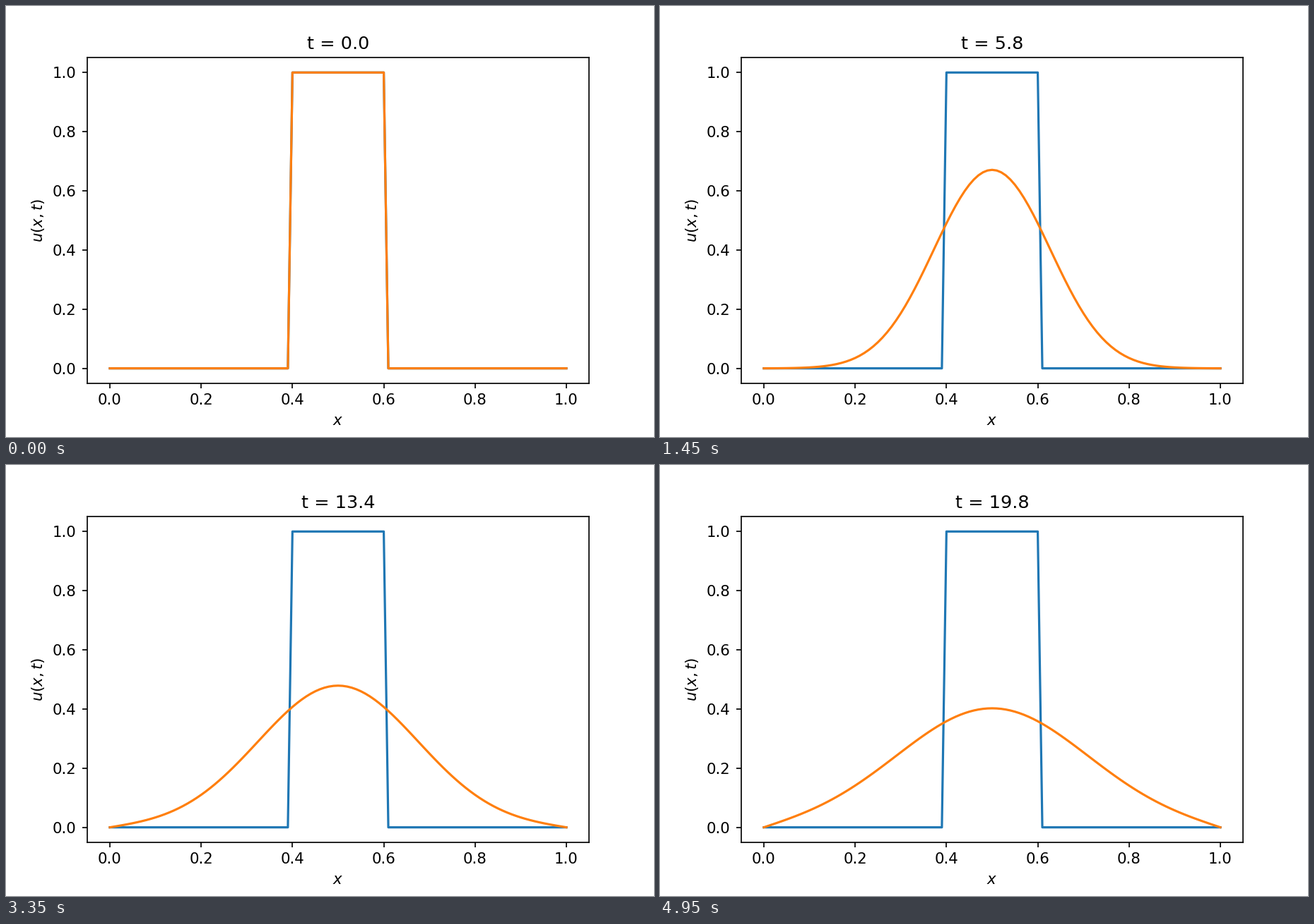
Animation of 917 by 611 pixels, one loop 5 s. Source, as a matplotlib script:

```python
import numpy as np
import matplotlib.pyplot as plt
from matplotlib.animation import FuncAnimation

WIDTH, HEIGHT, DPI = 917, 611, 152.8
FRAMES, INTERVAL = 100, 50
TIME_STEP = 0.2
DIFFUSIVITY = 0.001
CELLS = 100

x = np.linspace(0, 1, CELLS + 1)
start = np.where(np.abs(x - 0.5) < 0.105, 1.0, 0.0)

# Sine modes of the heat equation on the grid, held at zero at both ends
k = np.arange(1, CELLS)
modes = np.sin(np.pi * np.outer(x, k))
weights = 2 / CELLS * modes.T @ start
rates = DIFFUSIVITY * (2 * CELLS * np.sin(np.pi * k / (2 * CELLS))) ** 2


def solve(t):
    if t == 0:
        return start
    return modes @ (weights * np.exp(-rates * t))


# The tiny margin keeps the pixel size from rounding down
fig, ax = plt.subplots(
    figsize=((WIDTH + 1e-6) / DPI, (HEIGHT + 1e-6) / DPI), dpi=DPI
)
fig.subplots_adjust(left=0.125, right=0.9, bottom=0.125, top=0.88)
ax.plot(x, start, color="#1f77b4")
(curve,) = ax.plot(x, start, color="#ff7f0e")
ax.set_xlabel("$x$")
ax.set_ylabel("$u(x, t)$")
title = ax.set_title("t = 0.0")


def update(frame):
    t = frame * TIME_STEP
    curve.set_ydata(solve(t))
    title.set_text(f"t = {t:.1f}")
    return curve, title


anim = FuncAnimation(
    fig, update, frames=FRAMES, interval=INTERVAL, repeat=True, repeat_delay=0
)
plt.show()
```
